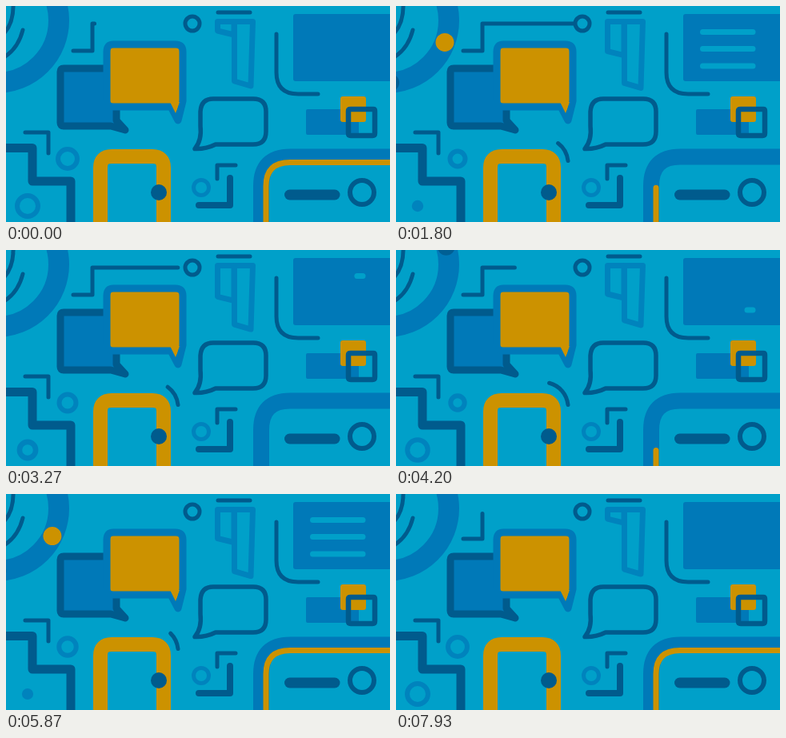
Write an HTML page that moves like this. It is 480 px wide and 270 px high and loops after 7990 ms.

```html
<!DOCTYPE html>
<html lang="en">
<head>
<meta charset="utf-8">
<title>Shapes in conversation</title>
<style>
  html, body { margin: 0; width: 100%; height: 100%; overflow: hidden; background: #00a0c9; }
  svg { display: block; width: 100vw; height: 100vh; }
  path, circle { fill: none; stroke-linecap: round; stroke-linejoin: round; }
  .dark { stroke: #005b8d; }
  .blue { stroke: #0079b8; }
  .mid { stroke: #0083bd; }
  .gold { stroke: #cc9200; }
  .light { stroke: #00a0c9; }
  .thin { stroke-width: 5; }
  .fillBlue { fill: #0079b8; }
  .fillGold { fill: #cc9200; }
  .fillDark { fill: #005b8d; }
</style>
</head>
<body>
<svg viewBox="0 0 480 270">
  <!-- concentric arcs and travelling balls -->
  <circle class="blue" cx="-12" cy="18" r="78" stroke-width="26"/>
  <path class="dark thin" d="M9 -4Q10 22 -4 36M21 30Q15 54 -4 65"/>
  <circle id="darkBall" class="fillDark" r="11" opacity=".85"/>
  <circle id="goldBall" class="fillGold" r="11.5"/>

  <!-- connector -->
  <path id="wire" class="dark thin" pathLength="1" d="M84 56H108V22H223"/>
  <circle class="dark thin" cx="233" cy="22" r="9"/>

  <!-- hanging columns -->
  <path class="dark thin" d="M265 8H305"/>
  <path id="shortCol" class="mid" stroke-width="7"/>
  <path id="longCol" class="mid" stroke-width="7"/>

  <!-- panel with text lines -->
  <rect class="fillBlue" x="359" y="10" width="125" height="84" rx="3"/>
  <g class="light" stroke-width="7">
    <path id="row0" pathLength="1" d="M446 75H383.5"/>
    <path id="row1" pathLength="1" d="M446 53.5H383.5"/>
    <path id="row2" pathLength="1" d="M446 32.5H383.5"/>
  </g>
  <path class="dark thin" d="M338 35V83Q338 110 365 110H390"/>

  <!-- speech bubbles -->
  <path class="dark fillBlue" stroke-width="9" d="M68 82q0-4 4-4H134q4 0 4 4V143L149 155L131 150H72q-4 0-4-4Z"/>
  <path class="blue fillGold" stroke-width="9" d="M134 48H212q9 0 9 9V119L215 143L206 126H134q-8 0-8-8V57q0-9 8-9Z"/>
  <path class="fillGold" d="M205 120H217L212 134Z"/>
  <path class="dark" stroke-width="5.5" d="M259 116H309Q325 116 325 132V157Q325 173 309 173H262Q250 179 236 178.500Q245 168 243 150V132Q244 116 259 116Z"/>

  <!-- overlapping squares -->
  <rect class="fillBlue" x="375" y="129" width="66" height="32" rx="2"/>
  <rect class="fillGold" x="418" y="113" width="32" height="32" rx="3"/>
  <path class="dark" stroke-width="6.500" d="M431 129H459Q461 129 461 131V159Q461 162 458 162H431Q428 162 428 159V131Q428 129 431 129Z"/>

  <!-- stairs, door and brackets -->
  <path class="dark" stroke-width="11" stroke-linejoin="miter" d="M-9 177.500H33V219H81V280"/>
  <path class="dark thin" d="M24 158H53V184"/>
  <path class="gold" stroke-width="18" d="M118 285V202Q118 188 132 188H183Q197 188 197 202V285"/>
  <circle class="fillDark" cx="191" cy="233" r="10"/>
  <path id="swoop" class="dark thin" pathLength="1" d="M215 193.500C213 177 200 165 182 165"/>
  <path class="dark" stroke-width="8" d="M241 249H280V215"/>
  <path class="dark thin" d="M264 216V199H287"/>
  <circle class="mid thin" cx="244" cy="227" r="9.500"/>
  <circle id="lowRing" class="mid" cx="27" cy="250"/>
  <circle id="highRing" class="mid" cx="77" cy="191"/>

  <!-- screen -->
  <path class="blue" stroke-width="20" d="M319 290V225Q319 188.500 355 188.500H500"/>
  <path id="trim" class="gold" stroke-width="7" pathLength="1" d="M325 273V225Q325 195.500 355 195.500H483"/>
  <path class="dark" stroke-width="13" d="M354.500 236H411"/>
  <circle class="dark" stroke-width="6" cx="445" cy="233" r="15"/>
</svg>
<script>
const LOOP = 7990, HALF = LOOP / 2, THIRD = LOOP / 3;
const $ = id => document.getElementById(id);
const mod = (a, n) => ((a % n) + n) % n;
const ease = u => (1 - Math.cos(Math.PI * Math.max(0, Math.min(1, u)))) / 2;

function set(id, attrs) {
  for (const k in attrs) $(id).setAttribute(k, attrs[k]);
}

// Show the first part of a path; nothing at all when it is almost gone.
function reveal(id, part) {
  set(id, {
    'stroke-dasharray': part + ' 2',
    visibility: part > 0.01 ? 'visible' : 'hidden'
  });
}

// Rise from 0 to 1 and later fall back to 0.
const pulse = (t, rise, riseTime, fall, fallTime) =>
  ease((t - rise) / riseTime) - ease((t - fall) / fallTime);

function moveBall(id, t) {
  const a = (-25 + 120 * ease(t / 2435)) * Math.PI / 180;
  set(id, { cx: -12 + 78 * Math.cos(a), cy: 18 + 78 * Math.sin(a) });
}

function sizeRing(id, outer, inner) {
  set(id, { r: (outer + inner) / 2, 'stroke-width': outer - inner });
}

// Eased interpolation through evenly named times.
const times = [0, 1200, 2470, 4200, 5200, 6530, LOOP];
function through(values, t) {
  let i = 0;
  while (t > times[i + 1]) i++;
  const u = ease((t - times[i]) / (times[i + 1] - times[i]));
  return values[i] + (values[i + 1] - values[i]) * u;
}

function draw(now) {
  const t = mod(now, LOOP), h = t % HALF, q = (t % THIRD) / THIRD;

  moveBall('darkBall', mod(h + 210, HALF));
  moveBall('goldBall', mod(h - 771, HALF));

  reveal('wire', pulse(mod(t + 1200, LOOP), 0, 2980, 4060, 2940));
  reveal('trim', 1 - pulse(t, 512, 1838, 3745, 2217));
  reveal('swoop', pulse(q, 0.02, 0.39, 0.412, 0.558));
  for (let i = 0; i < 3; i++)
    reveal('row' + i, pulse(h, i * 250, 950, 2000 + i * 245, 1000));

  const low = ease(2 * h / HALF) - ease(2 * h / HALF - 1);
  sizeRing('lowRing', 16 - 9 * low, 10 - 11 * low > 0 ? 10 - 11 * low : 0);
  const high = ease(2 * q) - ease(2 * q - 1);
  sizeRing('highRing', 15 - 3.5 * high, 9 - 3.5 * high);

  const a = through([31, 53, 61, 55, 57, 54, 31], t);
  const b = through([100, 102, 103, 94, 101, 104, 100], t);
  set('shortCol', { d: `M264.500 19.500H285V${a + 5}L264.500 ${a}Z` });
  set('longCol', { d: `M285.500 19.500H308.500L306 ${b}L285.500 ${b - 6}Z` });
}

function tick() {
  draw(performance.now());
  requestAnimationFrame(tick);
}
tick();
</script>
</body>
</html>
```
